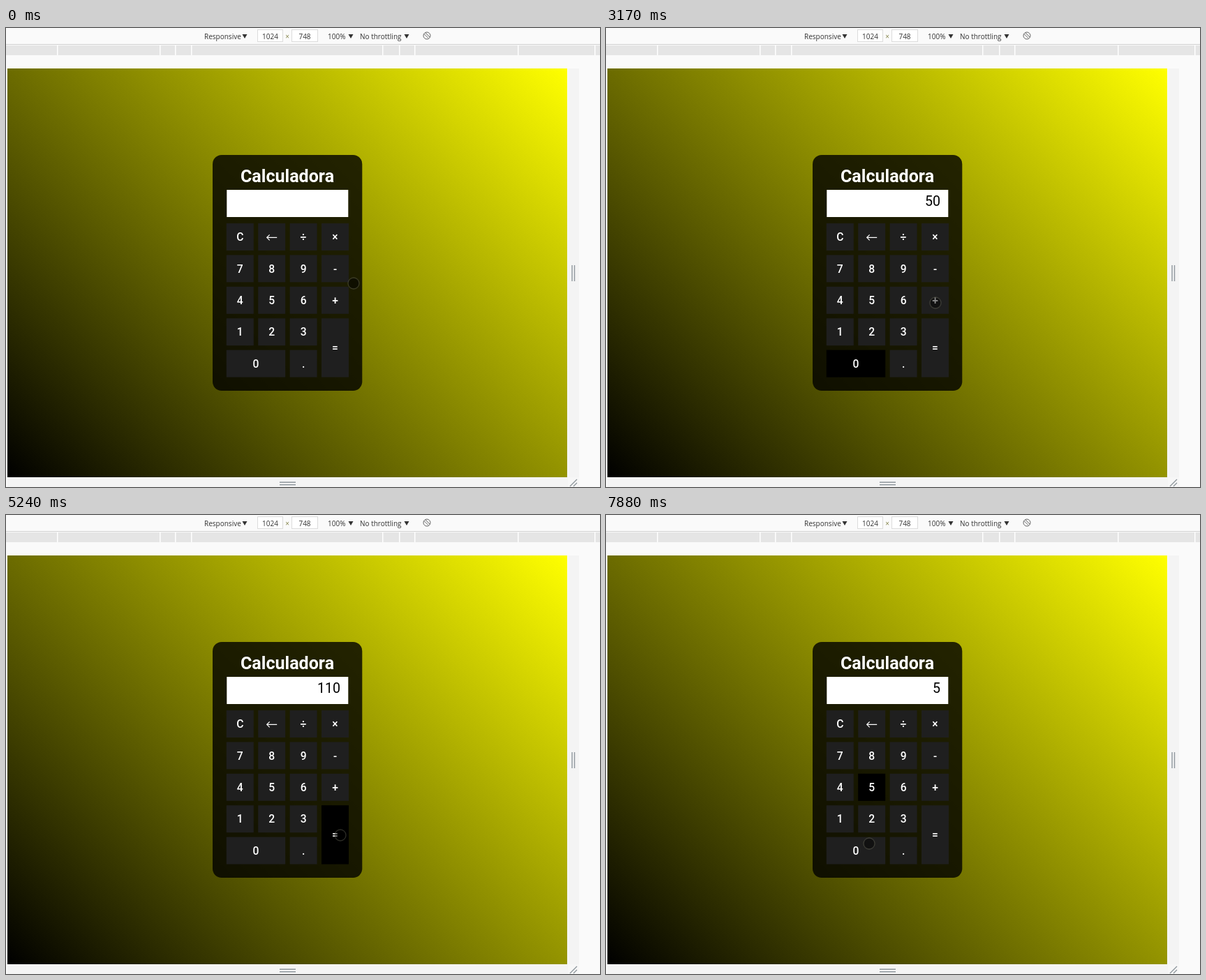
Write an HTML page that moves like this. It is 851x658 px and loops after 8000 ms.

```html
<!DOCTYPE html>
<html lang="en">
<head>
<meta charset="utf-8">
<title>Calculadora</title>
<style>
  html, body { margin: 0; width: 100%; height: 100%; overflow: hidden; background: #fafafa; }
  svg { display: block; width: 851px; height: 658px; }
  .bar { font: 10px "Open Sans", "Noto Sans", sans-serif; fill: #333; }
  .title { font: 700 25.06px Roboto, sans-serif; fill: #fff; text-anchor: middle; }
  .screen { font: 400 19.6px Roboto, sans-serif; fill: #000; text-anchor: end; }
  .key rect { fill: #1f1f1f; }
  .key.on rect { fill: #000; }
  .key text { font: 500 15.66px Roboto, sans-serif; fill: #fff; text-anchor: middle; }
  .key path { fill: none; stroke: #fff; stroke-width: 1.2; }
  .mid { text-anchor: middle; }
  .grip { fill: none; stroke: #8f979d; stroke-width: 1.4; }
  #cursor { fill: rgba(0, 0, 0, .45); stroke: rgba(150, 150, 125, .3); stroke-width: 1.3; }
  #cursor.down { fill: rgba(255, 240, 0, .5); stroke: rgba(255, 250, 140, .22); stroke-width: 2; }
</style>
</head>
<body>
<svg viewBox="0 0 851 658">
  <defs>
    <linearGradient id="sun" gradientUnits="userSpaceOnUse" x1="56" y1="698" x2="750" y2="4">
      <stop offset="0" stop-color="#000"/>
      <stop offset="1" stop-color="#ff0"/>
    </linearGradient>
  </defs>

  <rect width="851" height="658" fill="#fafafa"/>
  <rect y="23" width="851" height="1" fill="#d0d0d0"/>
  <rect y="25" width="851" height="14" fill="#e5e5e5"/>
  <g id="ticks" fill="#fff"></g>

  <g class="bar">
    <text x="284" y="16">Responsive</text>
    <text x="461" y="16">100%</text>
    <text x="507" y="16">No throttling</text>
    <path d="M338.500 9h7l-3.500 6zM490.500 9h7l-3.500 6zM570.500 9h7l-3.500 6z"/>
    <g fill="#fff" stroke="#dcdcdc">
      <rect x="360.500" y="2.500" width="36" height="17"/>
      <rect x="409.500" y="2.500" width="37" height="17"/>
    </g>
    <g class="mid">
      <text x="378.500" y="16">1024</text>
      <text x="403" y="16" fill="#85854a">×</text>
      <text x="428" y="16">748</text>
    </g>
    <g fill="none" stroke="#666">
      <circle cx="603" cy="11" r="5"/>
      <path d="M599 8.500l6 6M601 7l6 6"/>
    </g>
  </g>

  <rect x="805" y="58" width="16" height="586" fill="#f4f4f4"/>
  <rect x="2" y="644" width="803" height="14" fill="#f4f4f4"/>
  <rect x="805" y="644" width="16" height="14" fill="#f7f7f7"/>
  <path class="grip" d="M811 340v23M814.500 340v23M392 651.200h23M392 654.800h23M808 657l10-10M813 657l5-5"/>

  <rect x="2" y="58" width="802" height="586" fill="url(#sun)"/>
  <rect x="296" y="182" width="214.300" height="338" rx="13" fill="#000" fill-opacity=".8"/>
  <text class="title" x="403" y="221">Calculadora</text>
  <rect x="316.300" y="232" width="174" height="39" fill="#fff"/>
  <text class="screen" id="screen" x="479" y="255"></text>
  <g id="keys"></g>
  <circle id="cursor" r="8"/>
</svg>
<script>
const LOOP = 8000, PITCH = 45.4, SIZE = 39;
const $ = id => document.getElementById(id);

function add(parent, tag, attrs, text) {
  const el = document.createElementNS("http://www.w3.org/2000/svg", tag);
  for (const name in attrs) el.setAttribute(name, attrs[name]);
  if (text) el.textContent = text;
  return parent.appendChild(el);
}

for (const x of [73, 220, 242, 265, 539, 563, 585, 733, 843])
  add($("ticks"), "rect", { x, y: 25, width: 1.5, height: 14 });

const keys = {};
function addKey(label, col, row, cols = 1, rows = 1) {
  const x = 315.8 + col * PITCH, y = 280 + row * PITCH;
  const width = SIZE + (cols - 1) * PITCH, height = SIZE + (rows - 1) * PITCH;
  const cx = x + width / 2, cy = y + height / 2;
  const key = keys[label] = add($("keys"), "g", { class: "key" });
  add(key, "rect", { x, y, width, height });
  if (label === "←")
    add(key, "path", { d: `M${cx + 7.5} ${cy + .8}h-14.5m4-4l-4 4l4 4` });
  else
    add(key, "text", { x: cx, y: cy + 5.6 }, label);
}
["C←÷×", "789-", "456+", "123"].forEach((line, row) =>
  [...line].forEach((label, col) => addKey(label, col, row)));
addKey("=", 3, 3, 1, 2);
addKey("0", 0, 4, 2);
addKey(".", 2, 4);

// first step, last step, step count, end point
const moves = [
  [730, 1130, 6, 410, 344],
  [1200, 1200, 1, 400, 365],
  [1270, 1470, 3, 386, 387],
  [1740, 2020, 5, 373, 480],
  [2700, 3120, 7, 472, 394],
  [3340, 3490, 3, 431, 396],
  [3710, 3920, 4, 371, 479],
  [4270, 4620, 5, 475, 460],
  [4980, 4980, 1, 479, 459],
  [5310, 6010, 11, 383, 322],
  [6060, 6210, 3, 326, 292],
  [6650, 6800, 3, 399, 383],
  [6990, 7260, 5, 386, 397],
  [7600, 7880, 5, 377, 471]
];

// pressed, released, key, screen afterwards
const taps = [
  [1600, 1670, "5", "5"],
  [2220, 2280, "0", "50"],
  [3200, 3270, "+", "50+"],
  [3580, 3640, "6", "50+6"],
  [4110, 4180, "0", "50+60"],
  [4690, 4760, "=", "110"],
  [6460, 6580, "C", ""],
  [7460, 7530, "5", "5"]
];

function cursorAt(t) {
  let x = 498, y = 366;
  for (const [start, end, steps, toX, toY] of moves) {
    if (t < start) break;
    const gap = (end - start) / (steps - 1) || 1;
    const u = Math.min(1, (Math.floor((t - start) / gap + 1e-6) + 1) / steps);
    const eased = u * u * (3 - 2 * u);
    x += (toX - x) * eased;
    y += (toY - y) * eased;
  }
  return [x, y];
}

function draw(t) {
  const [x, y] = cursorAt(t);
  const down = taps.some(([from, to]) => t >= from && t < to);
  const last = taps.filter(tap => t >= tap[1]).pop() || [0, 0, "", ""];
  const cursor = $("cursor");
  cursor.setAttribute("cx", x);
  cursor.setAttribute("cy", y);
  cursor.setAttribute("r", down ? 8.7 : 8);
  cursor.classList.toggle("down", down);
  $("screen").textContent = last[3];
  for (const label in keys) keys[label].classList.toggle("on", label === last[2]);
}

const began = performance.now();
function frame() {
  draw((performance.now() - began) % LOOP);
  requestAnimationFrame(frame);
}
frame();
</script>
</body>
</html>
```
